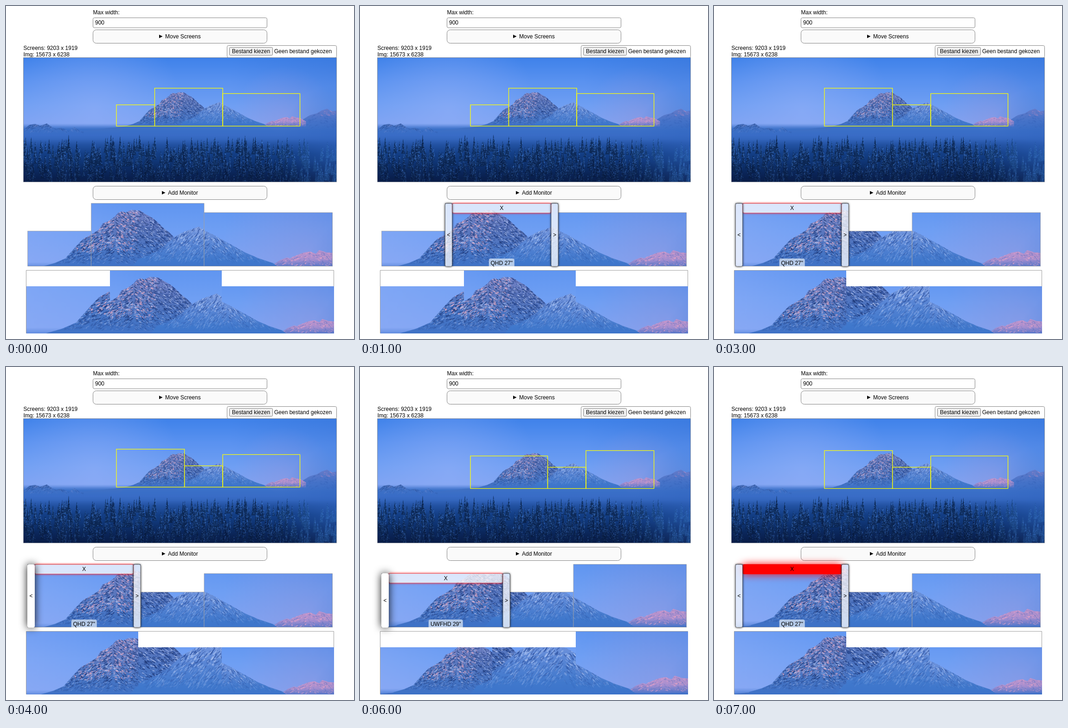
An HTML page with a canvas for the animation above (8000 ms loop, 750 by 720 pixels).

```html
<!DOCTYPE html>
<html lang="en">
<head>
<meta charset="utf-8">
<title>Monitor layout</title>
<style>
html, body { margin: 0; width: 750px; height: 720px; overflow: hidden; background: #fff; }
canvas { display: block; }
</style>
</head>
<body>
<canvas id="stage" width="750" height="720"></canvas>
<script>
const ctx = document.getElementById('stage').getContext('2d');
ctx.imageSmoothingQuality = 'high';

const PHOTO = { x: 38, y: 112, w: 674, h: 268, detail: 3 };
const ZOOM = 1.661;                       // preview size relative to the photo
const MONITORS = {
  F: { w: 137, h: 76.5, px: 1920, py: 1080, name: 'FHD 24"' },
  Q: { w: 243.5, h: 136, px: 2560, py: 1440, name: 'QHD 27"' },
  U: { w: 276.5, h: 116.5, px: 2560, py: 1080, name: 'UWFHD 29"' }
};
// One entry per second: order of monitors, bottom edge in the photo, active monitor, hot button
const STEPS = [
  { order: 'FQU', bottom: 260 },
  { order: 'FQU', bottom: 260, active: 'Q' },
  { order: 'FQU', bottom: 260, active: 'Q', hot: '<' },
  { order: 'QFU', bottom: 260, active: 'Q' },
  { order: 'QFU', bottom: 260, active: 'Q', hot: '<' },
  { order: 'UFQ', bottom: 263, active: 'U' },
  { order: 'UFQ', bottom: 263, active: 'U', hot: '<' },
  { order: 'QFU', bottom: 263, active: 'Q', hot: 'X' }
];

let seed = 7;
const random = (a = 0, b = 1) => {
  seed = (seed * 16807) % 2147483647;
  return a + (b - a) * seed / 2147483647;
};

function gradient(g, y0, y1, colors) {
  const fill = g.createLinearGradient(0, y0, 0, y1);
  colors.forEach((c, i) => fill.addColorStop(i / (colors.length - 1), c));
  return fill;
}

function glow(g, x, y, r, color) {
  const fill = g.createRadialGradient(x, y, 0, x, y, r);
  fill.addColorStop(0, color);
  fill.addColorStop(1, color.replace(/[\d.]+\)$/, '0)'));
  g.fillStyle = fill;
  g.fillRect(PHOTO.x, PHOTO.y, PHOTO.w, PHOTO.h);
}

// Slope with short rock and snow strokes; tint(x, y) picks each stroke's colour
function mountain(g, outline, body, [x0, y0, x1, y1], count, steep, tint) {
  const path = new Path2D(outline);
  g.save();
  g.clip(path);
  g.fillStyle = body;
  g.fill(path);
  const middle = (x0 + x1) / 2;
  for (let i = 0; i < count; i++) {
    const x = random(x0, x1), y = random(y0, y1), n = random(2, 7);
    g.strokeStyle = tint(x, y);
    g.lineWidth = random(0.6, 1.8);
    g.beginPath();
    g.moveTo(x, y);
    g.lineTo(x + n * (x < middle ? -0.8 : 0.8), y + n * steep * random(0.3, 1));
    g.stroke();
  }
  g.restore();
}

function tree(g, x, base, h, color) {
  const w = h * 0.13;
  g.fillStyle = color;
  g.beginPath();
  g.moveTo(x, base - h);
  for (let k = 1; k <= 5; k++) {
    g.lineTo(x + w * k / 5, base - h + h * k / 5);
    g.lineTo(x + w * k / 8, base - h + h * k / 5);
  }
  for (let k = 5; k > 0; k--) {
    g.lineTo(x - w * k / 8, base - h + h * k / 5);
    g.lineTo(x - w * k / 5, base - h + h * k / 5);
  }
  g.fill();
}

function paintForest(g) {
  g.fillStyle = gradient(g, 288, 380, ['rgba(24,66,140,0)', '#143f86', '#0d2f6a', '#0a2050']);
  g.fillRect(38, 288, 674, 92);
  for (let i = 0; i < 560; i++) {
    const depth = i / 560, x = random(36, 714), haze = Math.max(0, (x - 560) / 150);
    const h = random(20, 38), base = 313 + depth * 82 + haze * 8;
    const light = (1 - depth) * 10 + haze * 24 + random(0, 8);
    tree(g, x, base, h, `rgb(${6 + light * 0.6},${24 + light * 1.5},${62 + light * 2.2})`);
    for (let k = 0; k < 26; k++) {
      const drop = random(0.1, 0.95);
      g.fillStyle = `rgba(70,130,222,${random(0.25, 0.95 - depth * 0.4)})`;
      g.fillRect(x + random(-1, 1) * h * 0.13 * drop, base - h + h * drop, random(0.5, 1.8), random(0.5, 1.5));
    }
  }
  g.fillStyle = gradient(g, 335, 380, ['rgba(6,20,52,0)', 'rgba(6,20,52,.3)']);
  g.fillRect(38, 335, 674, 45);
  glow(g, 720, 300, 130, 'rgba(48,100,190,0.55)');
}

function paintPhoto() {
  const c = document.createElement('canvas'), k = PHOTO.detail;
  c.width = PHOTO.w * k;
  c.height = PHOTO.h * k;
  const g = c.getContext('2d');
  g.setTransform(k, 0, 0, k, -PHOTO.x * k, -PHOTO.y * k);

  g.fillStyle = gradient(g, 112, 265, ['#3f82ea', '#5a92f0', '#6f9ff3', '#82a4f2']);
  g.fillRect(38, 112, 674, 170);
  glow(g, 190, 225, 190, 'rgba(152,178,248,0.5)');
  glow(g, 600, 240, 110, 'rgba(166,160,226,0.45)');
  glow(g, 720, 130, 240, 'rgba(50,108,206,0.35)');
  g.fillStyle = gradient(g, 254, 267, ['rgba(58,112,200,0)', '#3a70c8']);
  g.fillRect(38, 254, 674, 126);

  mountain(g, 'M560 262L640 245 655 236 670 232 680 226 692 222 702 228 712 226V285H560Z',
    gradient(g, 222, 275, ['#7180cc', '#4d78cc', '#3a70c8']), [640, 222, 712, 262], 130, 0.6,
    (x, y) => y < 236 && x > 676 ? 'rgba(216,150,196,.55)' : 'rgba(58,100,184,.45)');
  mountain(g, 'M38 268L50 257 63 255 74 259 88 254 98 261 108 266 118 263 126 266 135 270 147 262 160 270 180 268 217 264 240 262 300 256V285H38Z',
    gradient(g, 253, 280, ['#4268b4', '#4272c4', '#3a70c8']), [40, 254, 165, 272], 160, 0.8,
    () => random() < 0.55 ? 'rgba(36,72,144,.6)' : 'rgba(132,150,212,.4)');

  // The central peaks are laid out in preview coordinates
  g.save();
  g.transform(1 / ZOOM, 0, 0, 1 / ZOOM, 210, 260 - 563 / ZOOM);
  mountain(g, 'M570 565L580 556 590 549 605 543 612 545 620 541 640 533 655 530 668 535 675 527 690 532 703 533 725 545V565Z',
    gradient(g, 526, 570, ['#c596cc', '#a68fd0', '#3a70c8']), [575, 526, 725, 560], 320, 0.6,
    () => random() < 0.6 ? 'rgba(240,166,198,.65)' : 'rgba(92,112,188,.5)');
  mountain(g, 'M40 600L80 562 105 555 128 545 140 531 150 520 165 504 183 494 200 483 208 470 222 464 235 454 241 447 250 443 258 446 270 440 290 442 300 449 315 457 328 468 340 480 352 489 361 498 440 600Z',
    gradient(g, 440, 585, ['#7381c4', '#5a77be', '#4574c4', '#3a70c8']), [95, 438, 375, 555], 3600, 0.65,
    (x, y) => {
      const fade = Math.min(1, (564 - y) / 40), pick = random();
      const lit = x < 288 - (y - 440) * 0.15 && y < 530;
      const rgb = pick < 0.42 ? '28,54,118' : lit && pick < 0.72 ? '246,176,194'
        : pick < (lit ? 0.95 : 0.65) ? '178,196,240' : '40,74,150';
      return `rgba(${rgb},${0.72 * fade})`;
    });
  mountain(g, 'M240 600L285 547 310 537 335 524 350 510 365 497 385 487 400 482 415 476 430 486 445 493 465 504 490 518 515 532 545 545 575 555 640 600Z',
    gradient(g, 476, 585, ['#7a9ae0', '#5885d4', '#4078cc', '#3a70c8']), [300, 476, 580, 550], 1700, 1.3,
    (x, y) => {
      const fade = Math.min(1, (562 - y) / 60);
      return `rgba(${random() < 0.5 ? '42,78,156' : '176,198,244'},${0.6 * fade})`;
    });
  g.restore();

  g.fillStyle = gradient(g, 258, 302, ['rgba(58,112,200,0)', '#396cc6', '#2a5cb0']);
  g.fillRect(38, 258, 674, 122);
  paintForest(g);
  return c;
}

const photo = paintPhoto();

function box(x, y, w, h, r, fill, stroke) {
  ctx.beginPath();
  ctx.roundRect(x, y, w, h, r);
  if (fill) {
    ctx.fillStyle = fill;
    ctx.fill();
  }
  if (stroke) {
    ctx.strokeStyle = stroke;
    ctx.stroke();
  }
}

// Casts a shadow around a rounded box without darkening its inside
function shadow(x, y, w, h, r, color, blur) {
  ctx.save();
  ctx.beginPath();
  ctx.rect(0, 0, 750, 720);
  ctx.roundRect(x, y, w, h, r);
  ctx.clip('evenodd');
  ctx.shadowColor = color;
  ctx.shadowBlur = blur;
  box(x, y, w, h, r, color);
  ctx.restore();
}

function text(s, x, y, align = 'left') {
  ctx.font = '12px "Liberation Sans", Arial, sans-serif';
  ctx.textAlign = align;
  ctx.fillStyle = '#000';
  ctx.fillText(s, x, y);
}

function summary(label, x, y) {
  box(187.5, y, 375, 29, 7, '#fafafa', '#858585');
  ctx.fillStyle = '#000';
  ctx.beginPath();
  ctx.moveTo(x, y + 10.5);
  ctx.lineTo(x + 7.5, y + 14.2);
  ctx.lineTo(x, y + 18);
  ctx.fill();
  text(label, x + 13, y + 18.5);
}

function drawForm() {
  text('Max width:', 187.5, 18);
  box(187.5, 25.5, 375, 21.5, 3, '#fff', '#858585');
  text('900', 192, 40);
  summary('Move Screens', 330, 51.5);
  text('Screens: 9203 x 1919', 37.5, 95);
  text('Img: 15673 x 6238', 37.5, 109);
  box(476.5, 85.5, 236, 26, 3, '#fff', '#858585');
  box(481.5, 89.5, 93, 17, 2, '#efefef', '#808080');
  text('Bestand kiezen', 487, 102);
  text('Geen bestand gekozen', 578, 102);
  ctx.drawImage(photo, PHOTO.x, PHOTO.y, PHOTO.w, PHOTO.h);
  box(37.5, 111.5, 675, 269, 0, null, '#8f95a0');
  summary('Add Monitor', 336, 389.5);
}

function crop(area, x, y, w, h) {
  const k = PHOTO.detail;
  ctx.drawImage(photo, (area.x - PHOTO.x) * k, (area.y - PHOTO.y) * k, area.w * k, area.h * k, x, y, w, h);
}

function outline({ x, y, w, h }) {
  ctx.save();
  ctx.lineWidth = 1.3;
  box(x, y, w, h, 0, null, '#ff0');
  ctx.restore();
}

function drawControls(m, x, hot) {
  const y = 563 - m.h, middle = x + m.w / 2, glass = 'rgba(255,255,255,.75)';
  const control = (label, left, w, h, glowColor, hotFill, rim) => {
    const on = label === hot;
    shadow(left, y, w, h, 3, glowColor, on ? 18 : 5);
    box(left, y, w, h, 3, on ? hotFill : glass, on ? hotFill : rim);
    text(label, left + w / 2, y + h / 2 + 4, 'center');
  };
  control('X', x + 15.5, m.w - 31, 20.5, 'red', 'red', 'rgba(225,70,85,.75)');
  control('<', x, 15, m.h, '#000', '#fff', 'rgba(70,75,85,.6)');
  control('>', x + m.w - 15, 15, m.h, '#000', '#fff', 'rgba(70,75,85,.6)');
  const w = m.name.length > 8 ? 74 : 55;
  box(middle - w / 2, 546, w, 17, [4, 4, 0, 0], 'rgba(225,235,245,.72)');
  text(m.name, middle, 560, 'center');
}

function draw(now) {
  const { order, bottom, active, hot } = STEPS[Math.floor(now / 1000) % STEPS.length];
  ctx.fillStyle = '#fff';
  ctx.fillRect(0, 0, 750, 720);
  drawForm();

  box(43.5, 571.5, 663, 136, 0, '#fff', '#a0a0a0');
  let x = 46.5, px = 43.5, activeX;
  const areas = [], scale = 663 / 7040;
  for (const key of order) {
    const m = MONITORS[key];
    const area = { w: m.w / ZOOM, h: m.h / ZOOM, x: 238 + (x - 46.5) / ZOOM };
    area.y = bottom - 0.4 - area.h;
    areas.push(area);
    crop(area, x, 563 - m.h, m.w, m.h);
    box(x, 562.5 - Math.floor(m.h), m.w, Math.floor(m.h), 0, null, 'rgba(160,162,166,.8)');
    crop(area, px, 707.5 - m.py * scale, m.px * scale, m.py * scale);
    if (key === active) activeX = x;
    x += m.w;
    px += m.px * scale;
  }
  areas.forEach(outline);
  if (active) drawControls(MONITORS[active], activeX, hot);
  requestAnimationFrame(draw);
}
requestAnimationFrame(draw);
</script>
</body>
</html>
```
